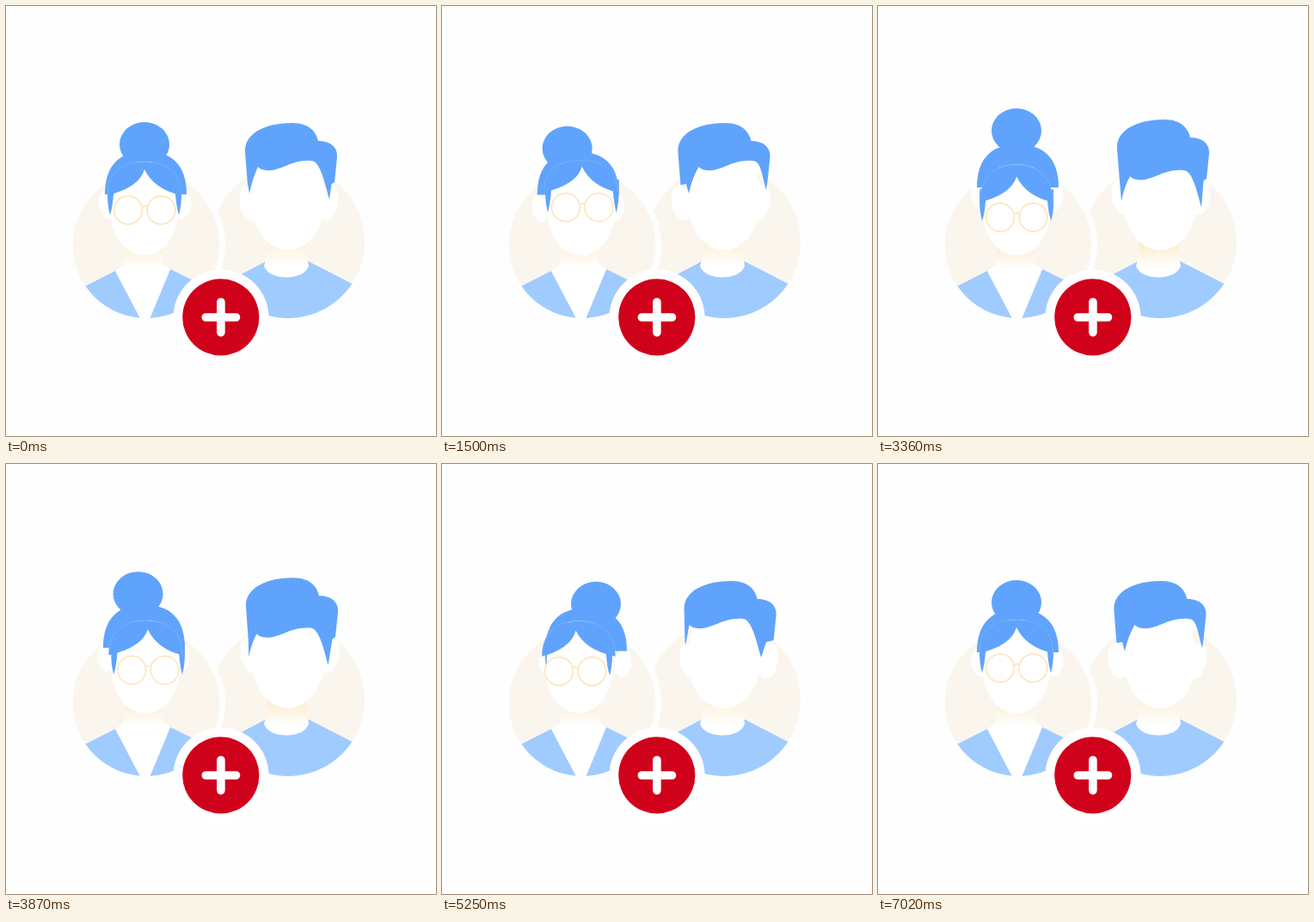
Animation, 500 px wide and 500 px high, one loop 7050 ms. Source, as an HTML page with a canvas:

```html
<!DOCTYPE html>
<html lang="en">
<head>
<meta charset="utf-8">
<title>Add people</title>
<style>
html, body { margin: 0; width: 100%; height: 100%; overflow: hidden; background: #fefefe; }
canvas { display: block; width: 500px; height: 500px; }
</style>
</head>
<body>
<canvas id="stage" width="500" height="500"></canvas>
<script>
const ctx = document.getElementById('stage').getContext('2d');
const LOOP = 7050;
const LAG = 185; // the back of her head trails the face
const HAIR = '#60a3fc', SHIRT = '#a0cbff', SAND = '#faf6ee', RED = '#d0021b';

// Head turns: time, yaw, pitch (positive pitch looks down)
const womanTurns = [
  [0, 0, 0], [650, 1, .1], [1180, 1, 0], [2000, -1, -.87], [2180, -1, -.87], [3050, 0, 1],
  [3280, 0, 1], [4200, 1, .2], [4400, 1, .2], [4900, -1, .2], [6100, -1, .2], [6850, 0, 0], [LOOP, 0, 0]
];
const manTurns = [
  [0, 0, 0], [760, 1, 0], [1480, -1, 0], [1560, -1, 0], [2240, 0, -.8], [2360, 0, -.8],
  [3200, 0, 1], [3480, 0, 1], [4470, .8, .9], [5080, 1, 0], [6100, 1, 0], [6960, -1, 0], [LOOP, -1, 0]
];

function turnAt(turns, time) {
  const t = (time + LOOP) % LOOP;
  const i = turns.findIndex(k => k[0] > t);
  const [t0, yaw0, pitch0] = turns[i - 1], [t1, yaw1, pitch1] = turns[i];
  const u = (t - t0) / (t1 - t0), s = u * u * (3 - 2 * u);
  return { yaw: yaw0 + (yaw1 - yaw0) * s, pitch: pitch0 + (pitch1 - pitch0) * s };
}

function oval(x, y, rx, ry, color, turn = 0) {
  ctx.fillStyle = color;
  ctx.beginPath();
  ctx.ellipse(x, y, rx, ry, turn, 0, 7);
  ctx.fill();
}
const disc = (x, y, r, color) => oval(x, y, r, r, color);

function shape(color, draw) {
  ctx.fillStyle = color;
  ctx.beginPath();
  draw();
  ctx.closePath();
  ctx.fill();
}

function poly(color, ...pts) {
  shape(color, () => pts.forEach(p => ctx.lineTo(...p)));
}

function inside(path, draw) {
  ctx.save();
  ctx.beginPath();
  path();
  ctx.clip();
  draw();
  ctx.restore();
}

function portrait(x, y, r, draw) {
  disc(x, y, r, SAND);
  inside(() => ctx.arc(x, y, r, 0, 7), draw);
}

function shade(top, bottom, alpha) {
  const g = ctx.createLinearGradient(0, top, 0, bottom);
  g.addColorStop(0, `rgba(252,232,196,${alpha})`);
  g.addColorStop(1, 'rgba(252,232,196,0)');
  return g;
}

function dome(l, r, foot, top, lift) {
  const c = (l + r) / 2, k = (r - l) * .31;
  ctx.moveTo(l, foot);
  ctx.bezierCurveTo(l, foot - lift, c - k, top, c, top);
  ctx.bezierCurveTo(c + k, top, r, foot - lift, r, foot);
}

function womanBody(alpha) {
  portrait(163, 277.6, 85.4, () => {
    poly(SHIRT, [70, 337], [127, 308], [157, 365], [70, 365]);
    poly(SHIRT, [191, 306], [250, 335], [250, 365], [166.5, 365]);
    const neck = () => {
      ctx.moveTo(139, 270);
      ctx.lineTo(138, 296);
      ctx.quadraticCurveTo(137, 303, 127, 308);
      ctx.lineTo(157, 365);
      ctx.lineTo(166.5, 365);
      ctx.lineTo(191, 306);
      ctx.quadraticCurveTo(182, 302, 182, 296);
      ctx.lineTo(181, 270);
    };
    shape('#fff', neck);
    shape(shade(284, 304, alpha), neck);
  });
}

function womanHead(front, rear) {
  const { yaw, pitch } = rear, sway = yaw * yaw;
  const fx = 6 * front.yaw, fy = 8.5 * front.pitch - 2 * front.yaw;
  const ex = -4.5 * yaw, ey = 3.5 * sway + yaw - 9 * pitch;
  const capL = 115 - 5 * yaw, capR = 210 - 5 * yaw, capY = -8 * pitch;

  oval(161 - 18 * yaw, 161 + 5 * sway - 16 * pitch, 29, 26, HAIR);
  oval(118 + ex, 231 + ey, 9.5, 16, '#fff', -.15);
  oval(206 + ex, 231 + ey, 9.5, 16, '#fff', .15);
  shape(HAIR, () => dome(capL, capR, 219 + capY, 169 + capY, 35));

  const l = 118 + fx * .3, r = 203.5 + fx * .3, end = 220 + fy, top = 181 + fy * .4;
  const hairline = () => dome(l, r, end, top, 27);
  const faceArea = () => {
    hairline();
    ctx.lineTo(r, 300);
    ctx.lineTo(l, 300);
  };
  inside(faceArea, () => oval(161 + fx * .3, 235, 40, 55, '#fff'));

  // Side strands stay inside the cap
  const root = 205 + fy, tip = 243 + fy * .8;
  const strand = (out, inn, dir) => shape(HAIR, () => {
    ctx.moveTo(out, root);
    ctx.lineTo(inn, root);
    ctx.lineTo(inn, 219 + fy);
    ctx.quadraticCurveTo(inn - dir, 233 + fy, out + dir * 3, tip);
    ctx.quadraticCurveTo(out, 232 + fy, out, 219 + fy);
  });
  const outL = Math.max(118 + fx, capL), outR = Math.min(204 + fx, capR);
  strand(outL, Math.max(125 + fx, outL + 2), 1);
  strand(outR, Math.min(197 + fx, outR - 2), -1);

  const px = 161 + fx * .9, py = 190 + fy;
  shape(HAIR, () => {
    hairline();
    ctx.quadraticCurveTo(px + 11, py + 23, px, py);
    ctx.quadraticCurveTo(px - 6, py + 21, l, end);
  });
  ctx.strokeStyle = 'rgba(255,255,255,.18)';
  ctx.lineWidth = .8;
  ctx.beginPath();
  hairline();
  ctx.stroke();

  ctx.strokeStyle = '#fde4b8';
  ctx.lineWidth = 1.5;
  const gx = 161.2 + fx, gy = 237.3 + fy;
  for (const d of [-19.2, 19.2]) {
    disc(gx + d, gy, 16.4, '#fff');
    ctx.stroke();
  }
  ctx.beginPath();
  ctx.moveTo(gx - 3.2, gy - 3.5);
  ctx.quadraticCurveTo(gx, gy - 6, gx + 3.2, gy - 3.5);
  ctx.stroke();
}

function manBody(alpha) {
  portrait(328, 274, 89, () => {
    poly(SHIRT, [235, 332], [302, 297], [352, 297], [420, 332], [420, 365], [235, 365]);
    const neck = () => {
      ctx.moveTo(304, 265);
      ctx.lineTo(303, 290);
      ctx.quadraticCurveTo(302, 297, 300, 302);
      ctx.bezierCurveTo(305, 320, 347, 320, 352, 302);
      ctx.quadraticCurveTo(351, 297, 350.5, 290);
      ctx.lineTo(350, 265);
    };
    shape('#fff', neck);
    shape(shade(279, 304, alpha), neck);
  });
}

function manHead({ yaw, pitch }) {
  const shift = (dx, dy) => (...p) => p.map((v, i) => v + (i % 2 ? dy : dx));
  const hx = 3.6 * yaw, hy = -4 * pitch;
  const h = shift(hx, hy);                          // outer hair
  const g = shift(-5.5 * yaw, 11 * pitch);          // fringe
  const ex = 4.5 * yaw, ey = -7 * pitch;
  const lx = Math.max(283 - 4 * yaw, 282 + hx * .3);
  const ly = 218 + 9 * pitch - 7 * Math.max(0, yaw);
  const rx = Math.min(376 - 5 * yaw, 377);
  const ry = 225 + 9 * pitch + 11 * Math.min(0, yaw);
  const left = Math.min(281 + hx, lx - .5), right = 382 + hx;

  oval(283 + ex, 229 + ey, 11, 21, '#fff', -.2);
  oval(375 + ex, 229 + ey, 11, 21, '#fff', .2);
  oval(328, 225, 43, 59, '#fff');
  shape(HAIR, () => {
    ctx.moveTo(lx, ly);
    ctx.lineTo(Math.max(left, lx - 3), 207 + hy);
    ctx.lineTo(left, 208 + hy);
    ctx.lineTo(...h(278, 170));
    ctx.bezierCurveTo(...h(277, 147, 303, 136, 333, 136));
    ctx.bezierCurveTo(...h(353, 136, 361, 147, 363, 157));
    ctx.bezierCurveTo(...h(377, 157, 386, 164, 385, 176));
    ctx.lineTo(right, 205 + hy);
    ctx.lineTo(Math.max(rx + 1, Math.min(right - 3.5, rx + 6)), 207 + hy);
    ctx.lineTo(rx, ry);
    ctx.bezierCurveTo(rx - 6, ry - 22, ...g(365, 180, 355, 180));
    ctx.bezierCurveTo(...g(332, 178, 319, 193, 303, 191));
    ctx.quadraticCurveTo(...g(297, 191, 293, 187));
    ctx.quadraticCurveTo(lx + 3, ly - 16, lx, ly);
  });
}

function badge() {
  disc(250, 362, 55.5, '#fff');
  disc(249.8, 361.9, 44.6, RED);
  ctx.strokeStyle = '#fff';
  ctx.lineWidth = 9.6;
  ctx.lineCap = 'round';
  ctx.beginPath();
  ctx.moveTo(232.3, 362);
  ctx.lineTo(267.5, 362);
  ctx.moveTo(249.9, 344.2);
  ctx.lineTo(249.9, 379.6);
  ctx.stroke();
  ctx.lineCap = 'butt';
}

function frame(time) {
  const t = time % LOOP;
  const face = turnAt(womanTurns, t), back = turnAt(womanTurns, t - LAG);
  const man = turnAt(manTurns, t);
  ctx.fillStyle = '#fefefe';
  ctx.fillRect(0, 0, 500, 500);
  manBody(.55 + man.pitch * .2);
  disc(163, 277.6, 92, '#fefefe');
  womanBody(.55 + face.pitch * .15);
  manHead(man);
  womanHead(face, back);
  badge();
}

const start = performance.now();
function tick() {
  frame(performance.now() - start);
  requestAnimationFrame(tick);
}
tick();
</script>
</body>
</html>
```
